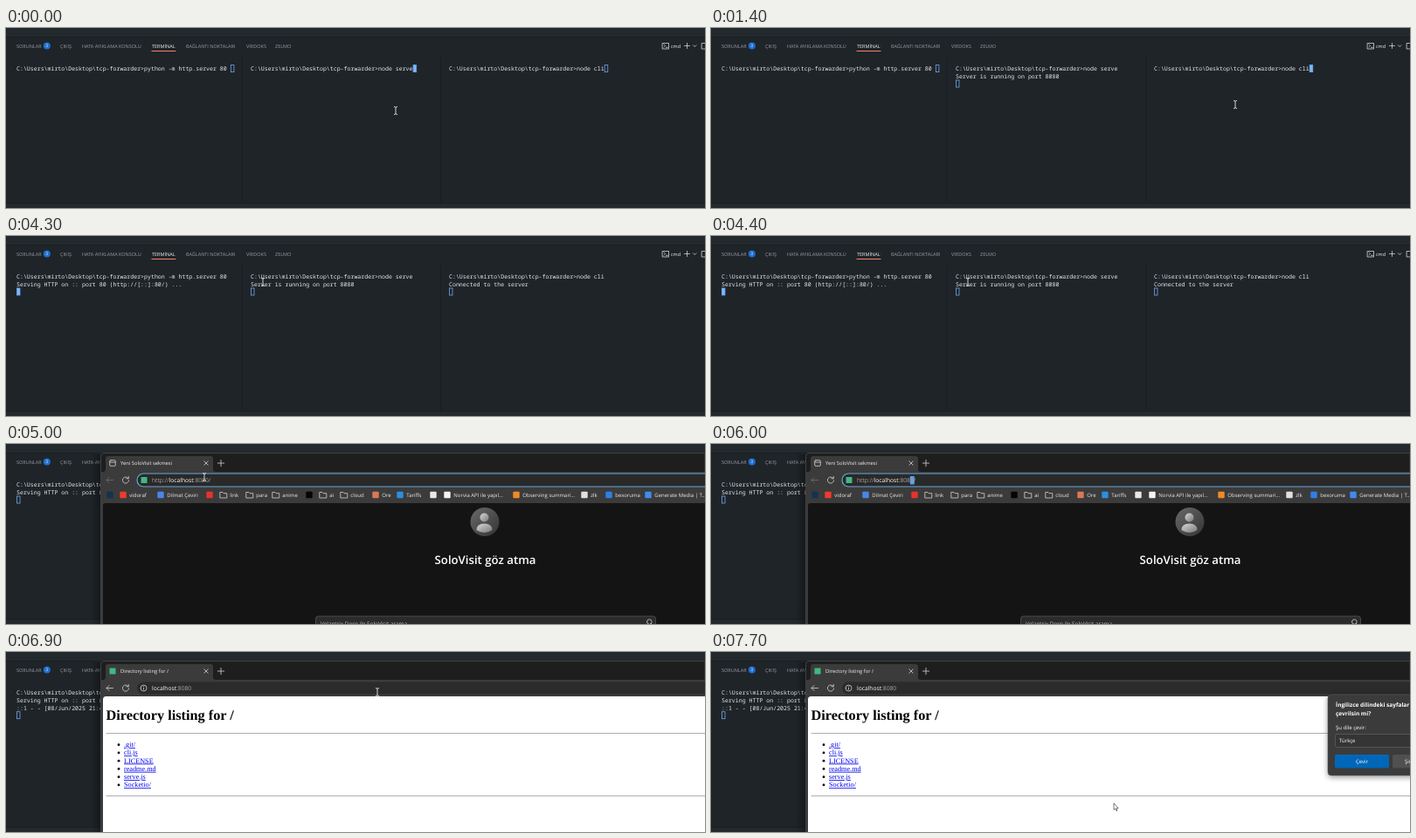
Recreate the animation shown at these times as an HTML page. Size 800 px wide and 207 px high, loop 7.8 s.

```html
<!DOCTYPE html>
<html lang="tr">
<head>
<meta charset="utf-8">
<title>TCP forwarder</title>
<style>
  html, body { margin: 0; width: 100%; height: 100%; overflow: hidden; background: #1f2428; }
  svg { display: block; width: 800px; height: 207px; }
  text { font-family: "Open Sans", "Noto Sans", sans-serif; text-rendering: geometricPrecision; white-space: pre; }
  .term text { font: 500 6.58px "Noto Sans Mono", "DejaVu Sans Mono", monospace; fill: #e6e9ed; }
  .tabs text { font-size: 5.5px; fill: #959da5; }
  .tabs .lit { fill: #f3f5f7; }
  .line { fill: none; stroke: #d4d4d4; stroke-width: .8; stroke-linecap: round; stroke-linejoin: round; }
  .title { font-size: 5.8px; fill: #f2f2f2; }
  .url { font-size: 6.7px; fill: #a9a9a9; }
  .url tspan { fill: #fff; }
  .marks text { font-size: 6px; fill: #ececec; }
  .page text { font: 8.2px "Liberation Serif", "Noto Serif", serif; fill: #00e; text-decoration: underline; }
  .page .head { font-size: 16.3px; font-weight: 700; fill: #000; text-decoration: none; }
  .popup text { font-size: 6px; fill: #fff; }
  .popup .ask { font-size: 6.5px; font-weight: 700; }
  .mid { text-anchor: middle; }
</style>
</head>
<body>
<svg viewBox="0 0 800 207" xmlns="http://www.w3.org/2000/svg">
  <defs>
    <linearGradient id="shade"><stop offset="0" stop-color="#000" stop-opacity="0"/><stop offset="1" stop-color="#000" stop-opacity=".35"/></linearGradient>
    <linearGradient id="face" x2="1" y2="1"><stop offset="0" stop-color="#6a6a6a"/><stop offset="1" stop-color="#333"/></linearGradient>
    <linearGradient id="bust" x2="1" y2="1"><stop offset="0" stop-color="#d8d8d8"/><stop offset="1" stop-color="#777"/></linearGradient>
    <filter id="drop" x="-20%" y="-20%" width="140%" height="140%"><feDropShadow dx="0" dy="2" stdDeviation="3" flood-opacity=".4"/></filter>
  </defs>

  <rect width="800" height="207" fill="#1f2428"/>
  <rect width="800" height="10" fill="#24292e"/>
  <rect y="10" width="800" height="1" fill="#191d21"/>
  <rect y="202" width="800" height="5" fill="#24292e"/>
  <path d="M0 201.5H800M270.5 33V201M497.5 33V201" stroke="#1a1e22"/>

  <g class="tabs">
    <text x="12" y="23">SORUNLAR</text>
    <circle cx="46.8" cy="20.6" r="4" fill="#1f6fd0"/>
    <text x="46.8" y="22.4" class="mid lit" style="font-size:5px">3</text>
    <text x="62" y="23">ÇIKIŞ</text>
    <text x="87" y="23">HATA AYIKLAMA KONSOLU</text>
    <text x="167" y="23" class="lit">TERMİNAL</text>
    <rect x="166.5" y="26" width="28" height="1" fill="#f9826c"/>
    <text x="206" y="23">BAĞLANTI NOKTALARI</text>
    <text x="275" y="23">VİRDOKS</text>
    <text x="308" y="23">ZELMO</text>
    <text x="761" y="22.6" class="lit">cmd</text>
    <path class="line" d="M751.5 17.5h7v6.500h-7zM753 19l1.500 1.500l-1.500 1.500M755.500 22.300h1.800M776.500 20.500h6M779.500 17.500v6M786.500 19.800l1.700 1.700l1.700-1.700M796.500 17.500h5v6.500h-5z"/>
  </g>
  <g class="term" id="term"></g>

  <g data-on="4600 7800">
    <rect x="97" y="12" width="12" height="195" fill="url(#shade)"/>
    <path d="M108.500 207V14q0-3.500 3.500-3.500H800V207z" fill="#1e1e1e" stroke="#4a4a4a" stroke-width=".8"/>
    <path d="M109 207V32h2q3 0 3-3V17q0-3 3-3H234q3 0 3 3V29q0 3 3 3H800V207z" fill="#3b3b3b"/>
    <path class="line" d="M226.800 19.800l4.400 4.400m0-4.400l-4.400 4.400M242.300 22h7.400M246 18.300v7.400"/>

    <g data-on="4600 6600">
      <rect x="118.700" y="18.700" width="6.600" height="6.600" rx="1.300" class="line"/>
      <path class="line" d="M119 21h6"/>
      <text x="131" y="24" class="title">Yeni SoloVisit sekmesi</text>
      <path class="line" d="M122.500 41.500h-7.500m3-3l-3 3l3 3" style="stroke:#707070"/>
      <rect x="150" y="34" width="660" height="15" rx="7.500" fill="#292929" stroke="#6aa5dc" stroke-width="1.200"/>
      <rect x="154.500" y="38" width="7" height="7" fill="#41b883"/>
      <rect x="227.800" y="37" width="5" height="9.500" fill="#559fe8" data-on="5800 6500"/>
      <text x="167" y="44" class="url">http://<tspan>localhost</tspan>:8080/</text>
      <path d="M111 207V71q0-3 3-3H800V207z" fill="#141414"/>
      <g class="marks" id="marks"></g>
      <circle cx="548" cy="89.500" r="16.500" fill="url(#face)"/>
      <circle cx="547.500" cy="84.500" r="5" fill="url(#bust)"/>
      <path d="M538.500 99q0-7.500 9-7.500t9 7.500q-9 6-18 0z" fill="url(#bust)"/>
      <text x="548.500" y="138" class="mid" style="font-size:13.200px;font-weight:600" fill="#fff">SoloVisit göz atma</text>
      <rect x="354.500" y="198" width="389" height="22" rx="3" fill="#2b2b2b" stroke="#555" stroke-width=".8"/>
      <text x="360" y="209" style="font-size:6.400px" fill="#c4c4c4">Velantrix Dorn ile SoloVisit arama</text>
      <path class="line" d="M733.500 204.500a2.800 2.800 0 1 1 5.600 0a2.800 2.800 0 1 1-5.600 0M738.300 206.600l2.500 2.400"/>
    </g>

    <g data-on="6600 7800">
      <path class="line" d="M122.500 41.500h-7.500m3-3l-3 3l3 3"/>
      <rect x="150" y="34.500" width="660" height="14" rx="7" fill="#2b2b2b"/>
      <path class="line" d="M154 41.500a3.500 3.500 0 1 1 7 0a3.500 3.500 0 1 1-7 0M157.500 41.200v2M157.500 39.600v.1"/>
      <text x="167" y="44" class="url"><tspan>localhost</tspan>:8080</text>
      <g class="page" id="page">
        <path d="M111 207V54.500q0-3.500 3.500-3.500H800V207z" fill="#fff"/>
        <text x="114.500" y="78" class="head">Directory listing for /</text>
        <path d="M114.500 93.500H800M114.500 165.500H800" stroke="#9a9a9a" stroke-width=".8"/>
      </g>
    </g>
    <g data-on="6600 6800">
      <circle id="spin" cx="119" cy="24.500" r=".6" fill="#ddd"/>
      <text x="131" y="24" class="title">localhost:8080</text>
      <path class="line" d="M134.500 39l5 5m0-5l-5 5"/>
    </g>
    <g data-on="6800 7800">
      <rect x="118.500" y="18.500" width="7" height="7" fill="#41b883"/>
      <text x="131" y="24" class="title">Directory listing for /</text>
    </g>
    <g data-on="4600 6600">
      <path class="line reload" d="M139.800 39.300a3.600 3.600 0 1 0 .800 2.500M140.300 37.500v2.300h-2.300"/>
    </g>
    <g data-on="6800 7800">
      <path class="line reload" d="M139.800 39.300a3.600 3.600 0 1 0 .800 2.500M140.300 37.500v2.300h-2.300"/>
    </g>

    <g class="popup" data-on="7200 7800">
      <rect x="706" y="49" width="110" height="93" rx="4" fill="#3b3b3b" stroke="#555" stroke-width=".6" filter="url(#drop)"/>
      <text x="715" y="63" class="ask">İngilizce dilindeki sayfalar</text>
      <text x="715" y="73" class="ask">çevrilsin mi?</text>
      <text x="715" y="89">Şu dile çevir:</text>
      <rect x="714.500" y="94.500" width="100" height="15" rx="2" fill="#353535" stroke="#626262" stroke-width=".7"/>
      <text x="719" y="104">Türkçe</text>
      <rect x="714" y="118" width="62" height="15.500" rx="2" fill="#0067b8"/>
      <text x="745" y="128" class="mid">Çevir</text>
      <rect x="780" y="118" width="62" height="15.500" rx="2" fill="#505050"/>
      <text x="794" y="128">Şimdi değil</text>
    </g>
  </g>

  <g id="mouse">
    <path id="beam" d="M-2-4.500q2 0 2 1.200q0-1.200 2-1.200M0-3.500V3.500M-2 4.500q2 0 2-1.200q0 1.200 2 1.200" fill="none" stroke="#e4e4e4" stroke-width=".9"/>
    <path id="arrow" d="M0 0V7.500L1.700 6L2.900 8.700L4 8.200L2.900 5.600H5.200z" fill="#fff" stroke="#222" stroke-width=".6"/>
  </g>
</svg>
<script>
const LOOP = 7800, STEP = 100;
const CHAR = 3.95, ROW = 8.7;
const $ = id => document.getElementById(id);

function add(parent, tag, attrs, text) {
  const el = document.createElementNS('http://www.w3.org/2000/svg', tag);
  for (const key in attrs) el.setAttribute(key, attrs[key]);
  if (text) el.textContent = text;
  parent.append(el);
  return el;
}

// Terminal panes
function print(x, row, text, from = 0) {
  add($('term'), 'text', { x, y: 49.3 + row * ROW, 'data-on': `${from} ${LOOP}` }, text);
}
function caret(x, row, from, to, solid) {
  add($('term'), 'rect', {
    x: x + .4, y: 42.6 + row * ROW, width: 3.6, height: 8,
    fill: solid ? '#79b8ff' : 'none', stroke: '#6ea8e8', 'stroke-width': .8,
    'data-on': `${from} ${to}`
  });
}
const prompt = 'C:\\Users\\mirto\\Desktop\\tcp-forwarder>';
const [left, middle, right] = [12, 280, 507];

print(left, 0, prompt + 'python -m http.server 80');
print(left, 1, 'Serving HTTP on :: port 80 (http://[::]:80/) ...', 3500);
print(left, 2, '::1 - - [08/Jun/2025 21:44:10] "GET / HTTP/1.1" 200 -', 6600);
caret(left + 62 * CHAR, 0, 0, 2500, false);
caret(left + 62 * CHAR, 0, 2500, 3500, true);
caret(left, 2, 3500, 4600, true);
caret(left, 2, 4600, 6600, false);
caret(left, 3, 6600, LOOP, false);

print(middle, 0, prompt + 'node serve');
print(middle, 1, 'Server is running on port 8080', 400);
caret(middle + 47 * CHAR, 0, 0, 400, true);
caret(middle, 2, 400, 1200, true);
caret(middle, 2, 1200, LOOP, false);

print(right, 0, prompt + 'node cli');
print(right, 1, 'Connected to the server', 2000);
caret(right + 45 * CHAR, 0, 0, 1200, false);
caret(right + 45 * CHAR, 0, 1200, 2000, true);
caret(right, 2, 2000, 2500, true);
caret(right, 2, 2500, LOOP, false);

// Bookmarks: icon centre, colour (none = folder), label
const marks = [
  [119, '#16324f'], [134, '#f03a2e', 'vidoraf'], [177, '#4a86e8', 'Dilmat Çeviri'],
  [233, '#e5322d'], [249, '', 'link'], [279, '', 'para'], [309, '', 'anime'],
  [347, '#050505'], [363, '', 'ai'], [387, '', 'cloud'], [423, '#d97757', 'Ore'],
  [451, '#2b8fe0', 'Tariffs'], [489, '#e8e8e8'], [505, '#f4f4f4', 'Norvia API ile yapıl...'],
  [584, '#f08a24', 'Observing summari...'], [662, '#e0e0e0', 'zlk'],
  [690, '#2f7fe6', 'bexoruma'], [735, '#3f8cf0', 'Generate Media | T...']
];
for (const [x, fill, label] of marks) {
  if (fill) add($('marks'), 'rect', { x: x - 3.7, y: 54.8, width: 7.4, height: 7.4, rx: 1, fill });
  else add($('marks'), 'path', { class: 'line', d: `M${x - 3.8} 55.500h2.800l1 1.200h3.800v5.300h-7.600z` });
  if (label) add($('marks'), 'text', { x: x + 7.3, y: 61 }, label);
}

// Directory listing
['.git/', 'cli.js', 'LICENSE', 'readme.md', 'serve.js', 'Socketio/'].forEach((name, i) => {
  const y = 109 + i * 9.25;
  add($('page'), 'circle', { cx: 129, cy: y - 2.3, r: 1.4, fill: '#000' });
  add($('page'), 'text', { x: 135, y }, name);
});

// Pointer path: time, x, y
const path = [
  [0, 446, 95], [300, 446, 95], [1100, 600, 88], [1700, 600, 88], [2400, 249, 47],
  [2600, 247, 45], [3300, 247, 45], [3900, 283, 55], [4100, 283, 55], [4300, 294, 53],
  [4500, 294, 53], [5000, 227, 38], [5500, 229, 41], [6200, 229, 41], [6600, 425, 46],
  [7100, 425, 46], [7400, 440, 90], [7700, 461, 174]
];
function pointer(t) {
  const i = path.findIndex(p => p[0] > t);
  if (i < 0) return path.at(-1).slice(1);
  const [t0, x0, y0] = path[i - 1], [t1, x1, y1] = path[i];
  const k = (t - t0) / (t1 - t0), e = k * k * (3 - 2 * k);
  return [x0 + (x1 - x0) * e, y0 + (y1 - y0) * e];
}

const show = (el, on) => { el.style.display = on ? '' : 'none'; };
const timed = [...document.querySelectorAll('[data-on]')].map(el => [el, ...el.dataset.on.split(' ').map(Number)]);

function draw(now) {
  const t = Math.floor(now % LOOP / STEP) * STEP;
  for (const [el, from, to] of timed) show(el, t >= from && t < to);
  $('mouse').setAttribute('transform', `translate(${pointer(t)})`);
  show($('mouse'), t < 5800 || t >= 6200);
  show($('beam'), t < 7200);
  show($('arrow'), t >= 7200);
  $('spin').setAttribute('transform', `rotate(${(t - 6600) * .6} 122 22)`);
}

let start;
function tick(now) {
  start ??= now;
  draw(now - start);
  requestAnimationFrame(tick);
}
draw(0);
requestAnimationFrame(tick);
</script>
</body>
</html>
```
